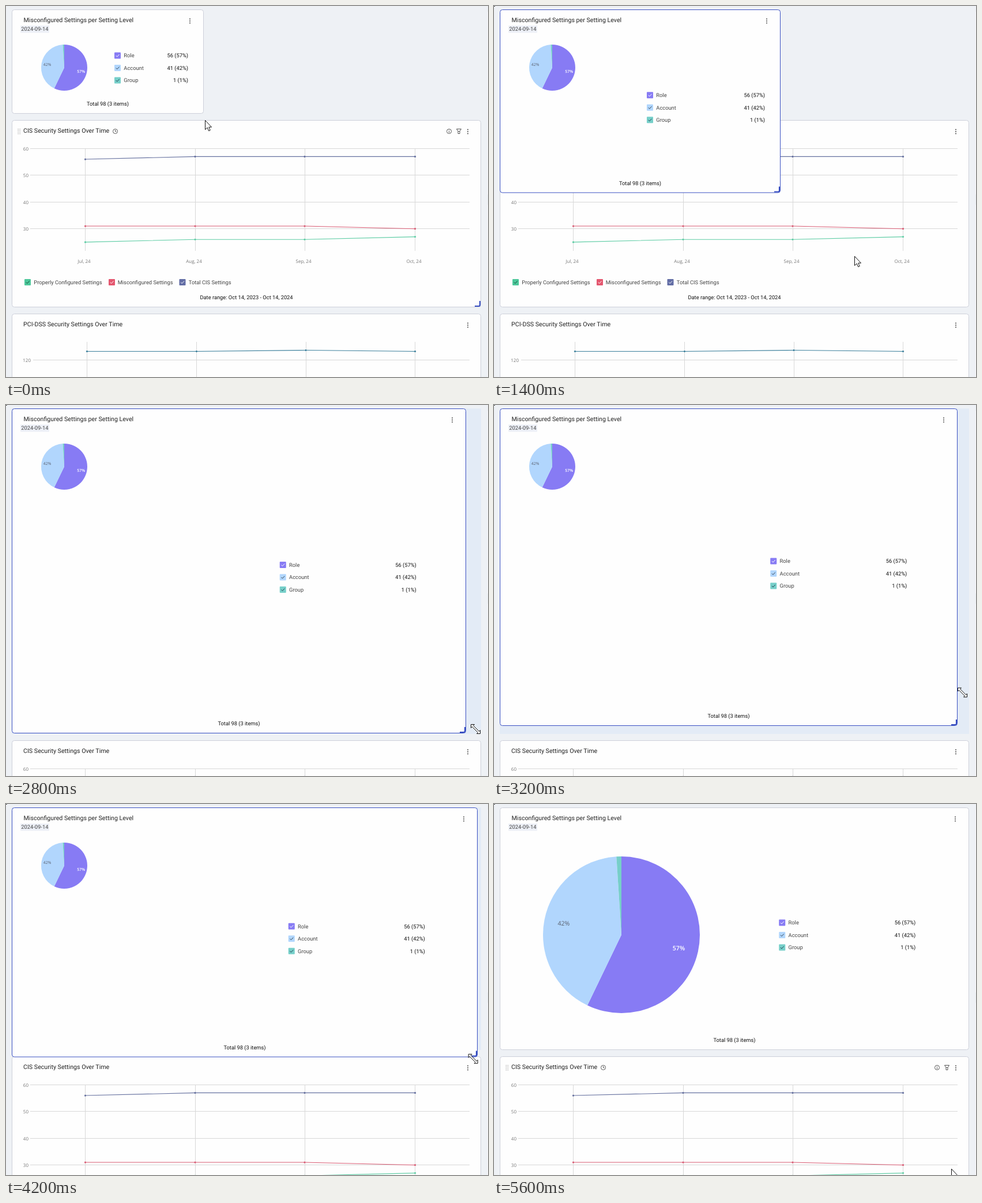
These frames come from a looping animation (836x644 px, 5.8 s). An HTML page:

```html
<!DOCTYPE html>
<html lang="en">
<head>
<meta charset="utf-8">
<title>Dashboard card resize</title>
<style>
html, body { margin: 0; width: 100%; height: 100%; overflow: hidden; background: #eef1f5; }
svg { display: block; width: 836px; height: 644px; text-rendering: geometricPrecision; }
text { font: 9.33px Roboto, sans-serif; fill: #444; }
.title { font-size: 10.67px; fill: #222; }
.dark { fill: #111; }
.axis { font: 8px "Open Sans", sans-serif; fill: #777; }
.pie { font-family: "Open Sans", sans-serif; }
.grid { stroke: #d8d8d8; fill: none; }
.icon { stroke: #555; fill: none; }
.dots { fill: #444; }
</style>
</head>
<body>
<svg id="stage" viewBox="0 0 836 644"></svg>
<script>
const LOOP = 5800, STEP = 200;
const BLUE = '#3a50c2';
const COLORS = { role: '#877bf4', account: '#b1d6fd', group: '#76cfc9' };

// Keys: time, then values, linear between keys
const cardKeys = [[0, 343, 187], [800, 343, 187], [1000, 352, 195], [1200, 415, 251], [1400, 497, 324.5],
  [1800, 676, 480], [2000, 735, 531], [2200, 781, 569], [2600, 792, 572], [3000, 804, 568],
  [3200, 804, 557], [3400, 814, 505], [3600, 820, 459], [4000, 818, 445], [4400, 818, 434],
  [4600, 823.6, 429], [4800, 824, 427]];
const topKeys = [[0, 198], [2200, 198], [2400, 460], [2600, 582], [3200, 582], [3400, 552],
  [3600, 492.5], [3800, 486], [4000, 470], [4200, 438]];
const slotKeys = [[0, 571], [3200, 571], [3400, 523], [3600, 475], [3800, 475], [4000, 427]];
const pointerKeys = [[0, 345, 198], [200, 348, 193], [400, 342, 187], [800, 342, 187], [1000, 400, 240],
  [1400, 625, 434], [1600, 700, 500], [2000, 756, 555], [2200, 782, 570], [2600, 815, 575],
  [3000, 814, 550], [3200, 812.5, 499], [3400, 813, 462], [3600, 813.5, 446], [4400, 809, 441],
  [4600, 803, 445], [5200, 803, 445], [5400, 800, 530], [5600, 793, 633]];
const pieKeys = [[4600, 219, 239, 145], [4800, 220.5, 229, 137.5], [5000, 221, 227, 136]];

function at(keys, t) {
  const i = keys.findIndex(k => k[0] > t);
  if (i < 0) return keys[keys.length - 1].slice(1);
  if (i === 0) return keys[0].slice(1);
  const a = keys[i - 1], b = keys[i], p = (t - a[0]) / (b[0] - a[0]);
  return a.slice(1).map((v, n) => v + (b[n + 1] - v) * p);
}

const text = (x, y, s, cls = '', anchor = 'start', extra = '') =>
  `<text x="${x}" y="${y}" class="${cls}" text-anchor="${anchor}" ${extra}>${s}</text>`;
const path = (d, attrs) => `<path d="${d}" ${attrs}/>`;
const circle = (x, y, r, attrs) => `<circle cx="${x}" cy="${y}" r="${r}" ${attrs}/>`;
const panel = (y, right, bottom, stroke = '#cdd0da') =>
  `<rect x="10.5" y="${y + .5}" width="${right - 11}" height="${bottom - y - 1}" rx="4" fill="#fefefe" stroke="${stroke}"/>`;
const menu = (x, y) => [-3.5, 0, 3.5].map(d => circle(x, y + d, 1, 'class="dots"')).join('');
const handle = (x, y) => path(`M${x - 11} ${y - 2}H${x - 4}Q${x - 2} ${y - 2} ${x - 2} ${y - 4}V${y - 11}`,
  `fill="none" stroke="${BLUE}" stroke-width="2.2"`);
const check = (x, y, color, tick = '#fff') =>
  `<rect x="${x}" y="${y - 5.5}" width="11" height="11" rx="1" fill="${color}"/>` +
  path(`M${x + 2.7} ${y}l2 2.1 3.8-4.1`, `fill="none" stroke="${tick}"`);

function series(xs, ys, color) {
  return path('M' + xs.map((x, i) => `${x} ${ys[i]}`).join('L'), `fill="none" stroke="${color}" stroke-width="1.1"`) +
    xs.map((x, i) => circle(x, ys[i], 1.6, `fill="${color}"`)).join('');
}

function pie(cx, cy, r, size) {
  const point = (share, d = r) => {
    const a = share * 2 * Math.PI;
    return [cx + d * Math.sin(a), cy - d * Math.cos(a)];
  };
  const slice = (a, b, color) => path(
    `M${cx} ${cy}L${point(a)}A${r} ${r} 0 ${b - a > .5 ? 1 : 0} 1 ${point(b)}Z`, `fill="${color}"`);
  const label = (share, s, color, weight) => {
    const [x, y] = point(share, r * .75);
    return text(x, y + size * .36, s, 'pie', 'middle', `style="font-size:${size}px;fill:${color};font-weight:${weight}"`);
  };
  const a = 56 / 98, b = 97 / 98;
  return slice(0, a, COLORS.role) + slice(a, b, COLORS.account) + slice(b, 1, COLORS.group) +
    label(a / 2, '57%', '#fff', 600) + label((a + b) / 2, '42%', '#5b6270', 400);
}

function pieCard(t) {
  const [right, bottom] = at(cardKeys, t);
  const resizing = t >= 600 && t < 4600;
  // The legend grows with the card up to a fixed width, then is centred
  const spare = Math.max(0, right - 561) / 4;
  const x = right / 2 + 16.5 + spare, end = Math.min(right - 27, x + 237);
  const rows = [['Role', '56 (57%)', COLORS.role, '#fff'], ['Account', '41 (42%)', COLORS.account, '#345'],
    ['Group', '1 (1%)', COLORS.group, '#245']];
  const legend = rows.map(([name, value, color, tick], i) => {
    const y = 86 + (bottom - 187) / 2 + i * 21.5;
    return check(x, y, color, tick) + text(x + 16.3, y + 3.3, name) + text(end, y + 3.3, value, 'dark', 'end');
  }).join('');
  const chart = t < 4600 ? pie(101, 107, 40, 6.9) : pie(...at(pieKeys, t), 10.67);
  return panel(6, right, bottom, resizing ? BLUE : undefined) +
    text(30.5, 28, 'Misconfigured Settings per Setting Level', 'title') +
    '<rect x="25" y="34" width="50" height="12.5" fill="#edf0f7"/>' + text(26.3, 43.3, '2024-09-14') +
    menu(right - 24, 26) + chart + legend +
    text((10 + right) / 2, bottom - 13.7, 'Total 98 (3 items)', 'dark', 'middle') +
    (t >= 400 && t < 4600 ? handle(right, bottom) : '');
}

function hoverIcons() {
  let s = '';
  for (let i = 0; i < 8; i++) s += `<rect x="${20.5 + i % 2 * 3}" y="${15 + (i >> 1) * 2.7}" width="1.3" height="1.3" fill="#aaa"/>`;
  return s + circle(189.5, 19.5, 4, 'class="icon"') + path('M189.5 17v2.8h2', 'class="icon"') +
    circle(768.5, 19.5, 4, 'class="icon"') + path('M768.5 19v3M768.5 17v1', 'class="icon"') +
    path('M781.5 15.5h8l-2.5 4h-3ZM784 19.5v4h3v-4', 'class="icon"') + handle(824, 325);
}

function cisCard(hover) {
  const xs = [137.5, 328, 518, 709.5], yOf = v => 49.5 + (60 - v) * 4.64;
  const line = (values, color) => series(xs, values.map(yOf), color);
  const months = ['Jul', 'Aug', 'Sep', 'Oct'];
  return panel(0, 824, 325) + text(30, 22, 'CIS Security Settings Over Time', 'title') + menu(801, 20) +
    (hover ? hoverIcons() : '') +
    [60, 50, 40, 30].map(v => {
      const y = Math.floor(yOf(v)) + .5;
      return path(`M42 ${y}H804`, 'class="grid"') + text(39, y + 3, v, 'axis', 'end');
    }).join('') +
    xs.map((x, i) => path(`M${Math.floor(x) + .5} 49V227`, 'class="grid"') +
      text(x - 2, 248, `${months[i]}, 24`, 'axis', 'middle')).join('') +
    line([56, 57, 57, 57], '#66719f') + line([31, 31, 31, 30], '#d95c74') + line([25, 26, 26, 27], '#5dcca4') +
    check(32, 281.5, '#4cc79a', '#143') + text(48.3, 285, 'Properly Configured Settings') +
    check(178, 281.5, '#e4576f') + text(193.7, 285, 'Misconfigured Settings') +
    check(300.5, 281.5, '#626da5') + text(316.8, 285, 'Total CIS Settings') +
    text(417, 311, 'Date range: Oct 14, 2023 - Oct 14, 2024', 'dark', 'middle');
}

function pciCard() {
  const xs = [140.5, 330.5, 520, 709.5];
  return panel(0, 824, 325) + text(30, 22, 'PCI-DSS Security Settings Over Time', 'title') + menu(801, 20) +
    path('M47 80.5H804', 'class="grid"') + text(43, 83.7, '120', 'axis', 'end') +
    xs.map(x => path(`M${Math.floor(x) + .5} 49V227`, 'class="grid"')).join('') +
    series(xs, [65.5, 65.5, 63.5, 65.5], '#3b7f9b');
}

function pointer(t) {
  const [x, y] = at(pointerKeys, t);
  const resize = (t >= 400 && t < 1000) || (t >= 2200 && t < 4600);
  const shape = resize ? 'M-8-8H-2L-4-6L6 4L8 2V8H2L4 6L-6-4L-8-2Z'
    : 'M.5.5V16.5L4.2 13.1L6.7 18.8L9.2 17.7L6.8 12.2H11.5Z';
  return path(shape, `transform="translate(${x} ${y})" fill="#fff" stroke="#111"`);
}

function scene(t) {
  const [top] = at(topKeys, t), [slot] = at(slotKeys, t);
  const placed = (y, s) => `<g transform="translate(0 ${y})">${s}</g>`;
  return '<rect width="836" height="644" fill="#eef1f5"/>' +
    path('M835.5 10V327M835.5 345V644', 'stroke="#fafafc"') +
    (t >= 2400 && t < 4600 ? `<rect x="10" y="6" width="814" height="${slot - 6}" fill="#e3ebf6"/>` : '') +
    placed(top + 336, pciCard()) + placed(top, cisCard(t < 200 || t >= 4600)) + pieCard(t) +
    (t >= 200 ? '<rect width="1.5" height="1" fill="#111"/>' : '') + pointer(t);
}

const stage = document.getElementById('stage');
const start = performance.now();
let shown = -1;
function tick() {
  const t = Math.floor((performance.now() - start) % LOOP / STEP) * STEP;
  if (t !== shown) stage.innerHTML = scene(shown = t);
  requestAnimationFrame(tick);
}
tick();
</script>
</body>
</html>
```
